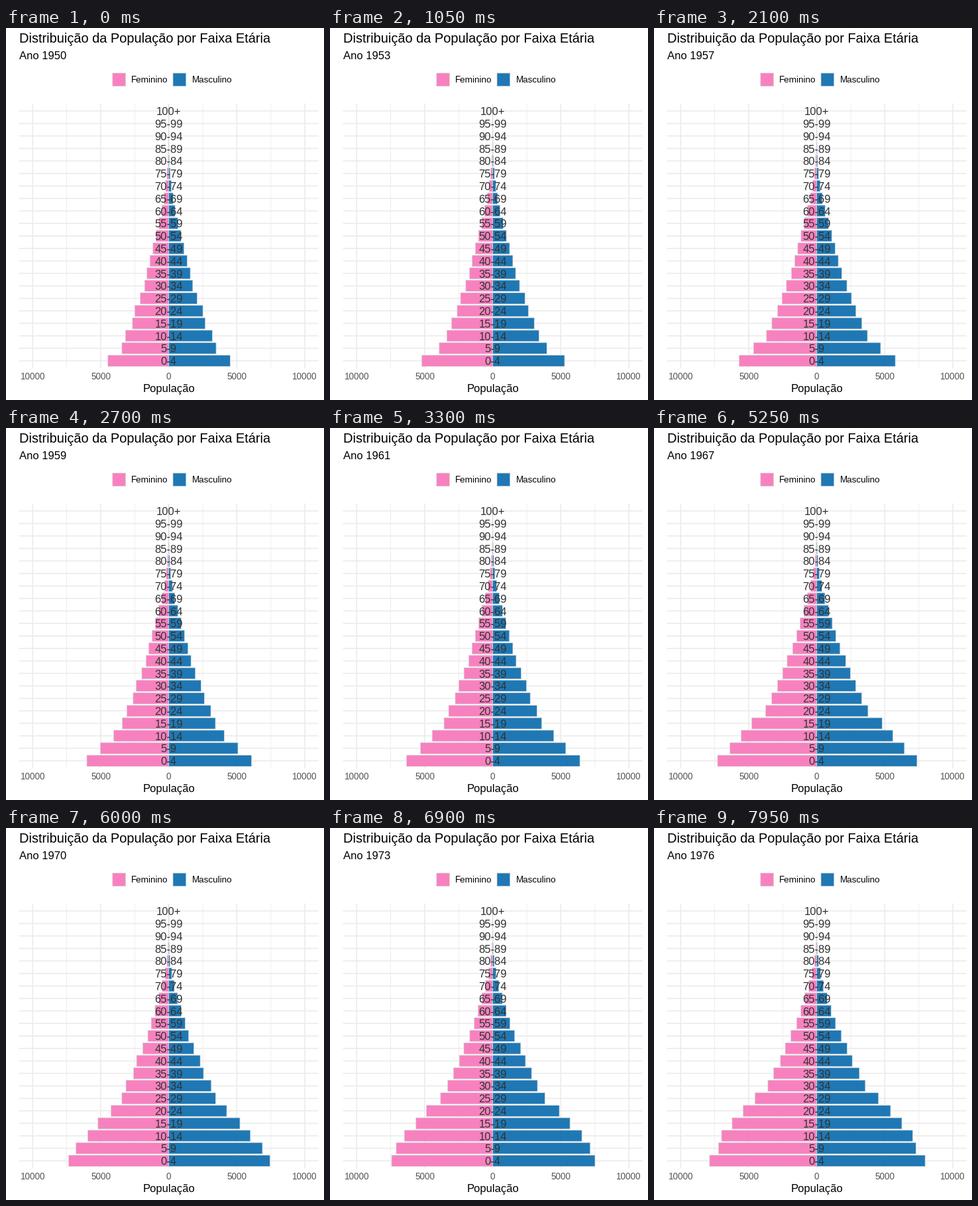
Recreate the animation shown at these times as a matplotlib script. Size 480 by 560 pixels, loop 8000 ms.

```python
import numpy as np
import matplotlib.pyplot as plt
from matplotlib.animation import FuncAnimation
from matplotlib.patches import Rectangle

plt.rcParams.update({
    "font.family": "Liberation Sans",
    "text.hinting": "default",
    "text.kerning_factor": 6,
    "toolbar": "None",
})

WIDTH, HEIGHT, DPI = 480, 560, 100
INTERVAL, LOOP, HOLD = 50, 8000, 3      # a new state every HOLD ticks
PINK, BLUE, OUTLINE, GRID = "#F781BF", "#1F78B4", "#DADADA", "#EBEBEB"

# Panel geometry in pixels
LEFT, RIGHT, TOP, BOTTOM = 19.7, 471.67, 113.6, 512.3
CENTER = (LEFT + RIGHT) / 2
SCALE = (RIGHT - LEFT) / 22000          # pixels per thousand people
PITCH = (BOTTOM - TOP) / 21.2
BAR = 0.9 * PITCH

AGES = [f"{a}-{a + 4}" for a in range(0, 100, 5)] + ["100+"]
GROUP = np.arange(len(AGES))

# Boys aged 0-4 in thousands, by years since 1950
COHORT_YEAR = [-100, -80, -60, -50, -35, -30, -25, -20, -15, -10, -5, -2.5,
               0, 3.5, 7, 11, 14.5, 17.5, 23, 26.5]
COHORT_SIZE = [200, 410, 855, 1260, 1850, 2000, 2320, 2740, 2900, 3440, 3710,
               4010, 4517, 5275, 5769, 6400, 7073, 7365, 7511, 7960]


def population(year):
    """Men and women per age group: each cohort ages and thins out."""
    born = np.interp(year - 5 * GROUP, COHORT_YEAR, COHORT_SIZE)
    hazard = 0.05 - 0.0015 * year + 0.0105 * np.exp(0.333 * GROUP)
    men = born * np.exp(-hazard * (GROUP > 0))
    women = men * (0.985 + 0.0045 * np.exp(0.27 * GROUP))
    return men, women


fig = plt.figure(figsize=(WIDTH / DPI, HEIGHT / DPI), dpi=DPI, facecolor="white")
ax = fig.add_axes([0, 0, 1, 1])
ax.set(xlim=(0, WIDTH), ylim=(HEIGHT, 0))
ax.axis("off")


def label(x, baseline, text, size, color="black", ha="left"):
    return ax.text(x, baseline, text, fontsize=size, color=color,
                   ha=ha, va="baseline", zorder=4)


def grid_line(xs, ys, width):
    ax.plot(xs, ys, color=GRID, lw=width, solid_capstyle="butt",
            snap=False, zorder=1)


def box(x, y, width, height, color):
    return ax.add_patch(Rectangle((x, y), width, height, facecolor=color,
                                  edgecolor=OUTLINE, lw=0.5, snap=False,
                                  joinstyle="miter", zorder=3))


def row_y(i):
    return BOTTOM - (0.6 + i) * PITCH


for value in range(-7500, 7501, 5000):
    x = CENTER + value * SCALE
    grid_line([x, x], [TOP, BOTTOM], 0.58)
for i in GROUP:
    grid_line([LEFT, RIGHT], [row_y(i)] * 2, 1.165)
for value in range(-10000, 10001, 5000):
    x = CENTER + value * SCALE
    grid_line([x, x], [TOP, BOTTOM], 1.165)
    label(x, 529.3, str(abs(value)), 9.6, "#4D4D4D", "center")

label(LEFT, 22.4, "Distribuição da População por Faixa Etária", 14.4)
subtitle = label(LEFT, 47, "", 12)
label(CENTER, 548.2, "População", 12, ha="center")

for x, name, color in [(160.8, "Feminino", PINK), (252, "Masculino", BLUE)]:
    box(x, 67.9, 19.8, 19.8, color)
    label(x + 28.6, 82.4, name, 9.6)

women_bars, men_bars = [], []
for i, age in enumerate(AGES):
    y = row_y(i)
    women_bars.append(box(CENTER, y - BAR / 2, 0, BAR, PINK))
    men_bars.append(box(CENTER, y - BAR / 2, 0, BAR, BLUE))
    label(CENTER, y + 6.25, age, 12, "#333333", "center")


def update(frame):
    step = frame // HOLD
    men, women = population(step / 2)
    for bar, count in zip(men_bars, men):
        bar.set_width(count * SCALE)
    for bar, count in zip(women_bars, women):
        bar.set_width(-count * SCALE)
    subtitle.set_text(f"Ano {1950 + step // 2}")
    return [subtitle, *women_bars, *men_bars]


anim = FuncAnimation(fig, update, frames=LOOP // INTERVAL, interval=INTERVAL,
                     repeat=True, repeat_delay=0, blit=False)
plt.show()
```
